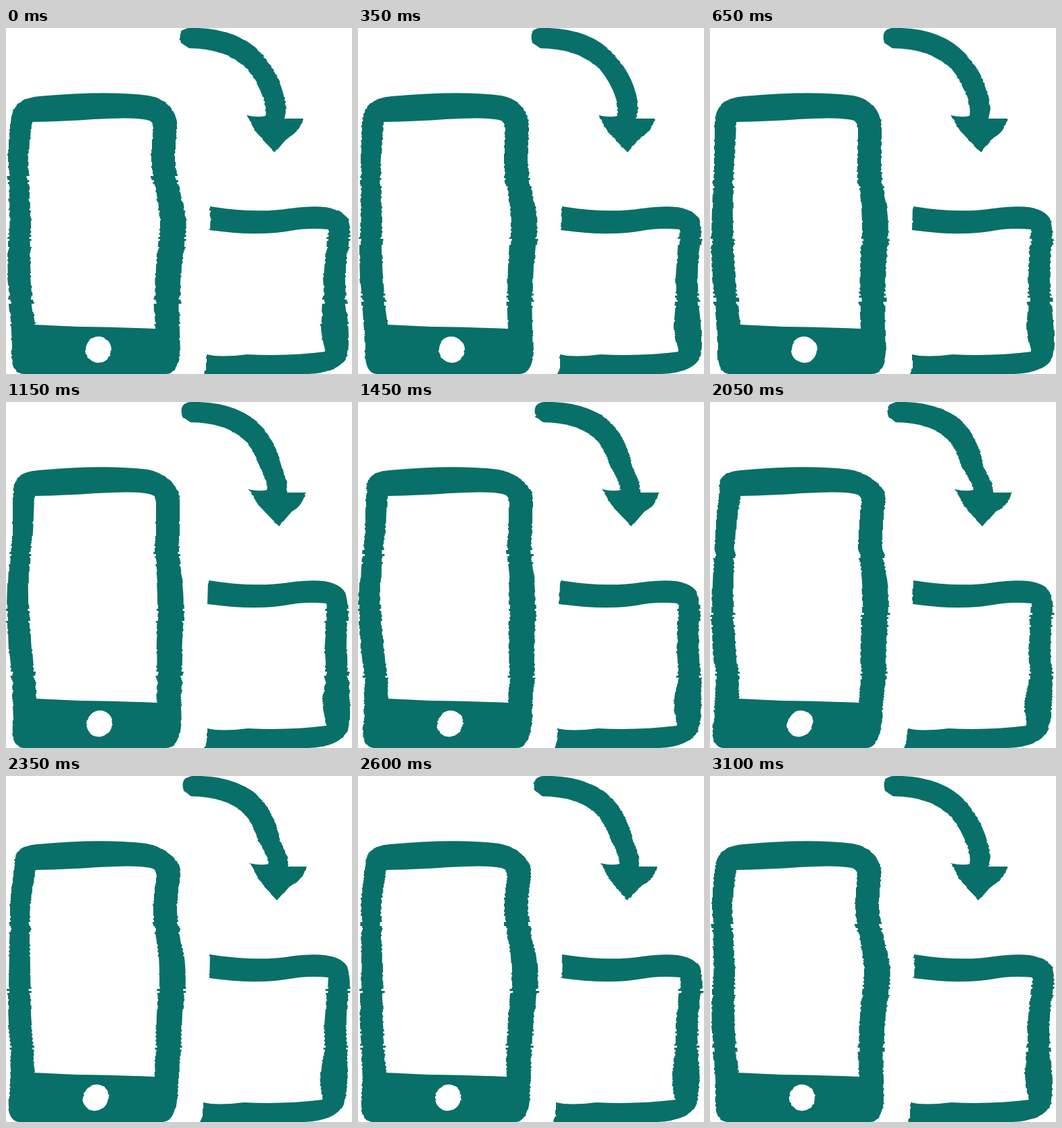
Recreate the animation shown at these times as an HTML page with a canvas. Size 512 px wide and 512 px high, loop 3.15 s.

```html
<!DOCTYPE html>
<html lang="en">
<head>
<meta charset="utf-8">
<title>Rotate device</title>
<style>
html, body { margin: 0; width: 100%; height: 100%; overflow: hidden; background: #fff; }
canvas { display: block; width: 100vw; height: 100vh; }
</style>
</head>
<body>
<canvas id="stage" width="512" height="512"></canvas>
<script>
const SIZE = 512, LOOP = 3150, STEP = 50, BEATS = 6;

const phone = `M7 140Q8 104 50 101Q150 92 212 100Q250 107 254 145V200Q255 235 262 262
  Q268 300 261 350Q258 410 261 480Q258 512 240 512H28Q9 510 12 470Q10 420 4 370Q1 300 7 210Z`;
const screen = `M39 139Q90 138 130 135Q195 131 212 137Q220 140 219 155V222Q227 260 226 310
  Q220 370 224 445Q150 442 110 442L46 439Q38 390 36 330Q33 250 37 190Z`;
const button = 'M121 476a19 19.5 0 1 0 38 0a19 19.5 0 1 0 -38 0Z';
const arrow = `M258 22Q252 2 270 0Q340 -2 378 38Q412 75 415 120L412 134H440Q436 154 420 162
  L401 184Q385 168 370 152L356 129Q372 133 384 130Q386 122 382 105Q374 80 357 60Q325 30 270 30Z`;
const tablet = `M301 264Q370 275 420 267Q490 257 504 282Q511 305 505 335Q502 370 506 410
  Q513 460 508 486Q498 510 450 512H296L300 503V483Q320 488 360 483Q420 486 476 479
  Q469 455 469 440Q474 400 471 370Q474 330 476 298Q445 295 420 300Q370 309 300 299Z`;

// Each height sways sideways on its own slow wave; peak is the time of its rightmost point
const waves = [
  { y: 20, mean: 3, amp: 3.5, peak: 1925 },
  { y: 95, mean: -3.5, amp: 3.5, peak: 350 },
  { y: 132, mean: 3, amp: 3.5, peak: 1925 },
  { y: 190, mean: -0.5, amp: 4, peak: 1450 },
  { y: 285, mean: 0, amp: 2.5, peak: 2900 },
  { y: 400, mean: -0.4, amp: 2.3, peak: 1500 },
  { y: 500, mean: -5, amp: 4.5, peak: 600 }
];
const roughBands = [224, 318, 404];

const mix = (a, b, u) => a + (b - a) * u;
const clamp = (v, lo, hi) => Math.max(lo, Math.min(hi, v));
const sway = (w, t) => w.mean + w.amp * Math.cos(2 * Math.PI * (t - w.peak) / LOOP);
const roughness = y => roughBands.reduce((sum, c) => sum + 2.2 * Math.exp(-(((y - c) / 11) ** 2)), 0.7);

function noise(a, b) {
  const s = Math.sin(a * 127.1 + b * 311.7) * 43758.5453;
  return (s - Math.floor(s)) * 2 - 1;
}

function jitter(y, t) {
  const beat = t / LOOP * BEATS, k = Math.floor(beat), strip = Math.floor(y / 3);
  return roughness(y) * mix(noise(strip, k + 1), noise(strip, (k + 1) % BEATS + 1), beat - k);
}

function rowShift(y, t) {
  const below = clamp(waves.findIndex(w => w.y > y), -1, waves.length - 1);
  const i = below < 0 ? waves.length - 1 : Math.max(1, below);
  const a = waves[i - 1], b = waves[i];
  const u = clamp((y - a.y) / (b.y - a.y), 0, 1);
  return mix(sway(a, t), sway(b, t), u) + jitter(y, t);
}

const art = document.createElement('canvas');
art.width = art.height = SIZE;
const pen = art.getContext('2d');
pen.fillStyle = '#087068';
pen.fill(new Path2D(phone + screen + button), 'evenodd');
pen.fill(new Path2D(arrow));
pen.fill(new Path2D(tablet));

const ctx = document.getElementById('stage').getContext('2d');

function draw(t) {
  ctx.fillStyle = '#fff';
  ctx.fillRect(0, 0, SIZE, SIZE);
  for (let y = 0; y < SIZE; y++) {
    ctx.drawImage(art, 0, y, SIZE, 1, Math.round(rowShift(y, t)), y, SIZE, 1);
  }
}

function tick() {
  const t = performance.now() % LOOP;
  draw(Math.floor(t / STEP) * STEP);
  requestAnimationFrame(tick);
}
tick();
</script>
</body>
</html>
```
